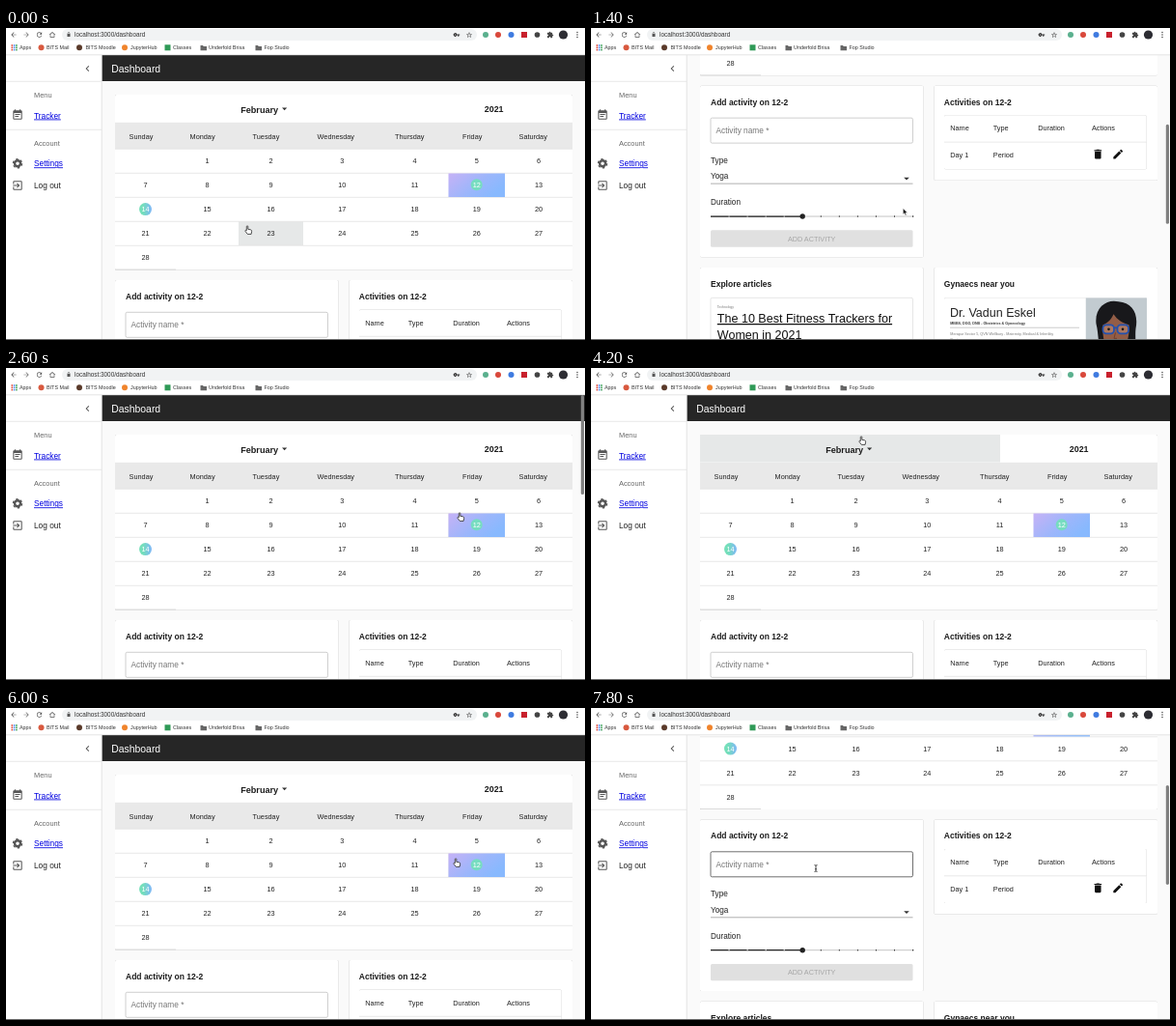
Recreate the animation shown at these times as an HTML page. Size 600x323 px, loop 8 s.

```html
<!DOCTYPE html>
<html lang="en">
<head>
<meta charset="utf-8">
<title>Dashboard</title>
<style>
html, body { margin: 0; width: 100%; height: 100%; overflow: hidden; background: #fff; }
svg { display: block; width: 100vw; height: 100vh; font-family: "Liberation Sans", Arial, sans-serif; }
text { white-space: pre; }
.card { fill: #fff; filter: drop-shadow(0 .5px .7px rgba(0,0,0,.32)); }
.link { text-decoration: underline; }
</style>
</head>
<body>
<svg id="stage" viewBox="0 0 600 323" preserveAspectRatio="none"></svg>
<script>
const LOOP = 8000, STEP = 200, TOP = 28;
const COLS = [113, 176, 241, 308, 388.5, 458.5, 517, 587];
const DAYS = ['Sunday', 'Monday', 'Tuesday', 'Wednesday', 'Thursday', 'Friday', 'Saturday'];
const ROW_Y = 125, ROW_H = 25;

const ICON = {
  back: 'M20 11H7.8l5.6-5.6L12 4l-8 8 8 8 1.4-1.4L7.8 13H20z',
  reload: 'M17.65 6.35A7.96 7.96 0 0012 4a8 8 0 107.73 10h-2.08A6 6 0 1112 6c1.66 0 3.14.69 4.22 1.78L13 11h7V4z',
  home: 'M12 3L2 12h3v8h14v-8h3zM7 18v-7.5l5-4.5 5 4.5V18z',
  lock: 'M18 9h-1V7A5 5 0 007 7v2H6v12h12zM9 9V7a3 3 0 016 0v2z',
  star: 'M12 2l3 7 7.500.6-5.700 4.900 1.800 7.500-6.600-4-6.600 4 1.800-7.500L1.500 9.600 9 9zM12 7l-1.600 4-4.400.4 3.400 2.800-1 4.300 3.600-2.300 3.600 2.300-1-4.300 3.400-2.800-4.400-.4z',
  key: 'M12.6 10a6 6 0 100 4H16v4h4v-4h3v-4zM7 14a2 2 0 110-4 2 2 0 010 4z',
  puzzle: 'M20 11h-1V7a2 2 0 00-2-2h-4V4a2.500 2.500 0 00-5 0v1H4a2 2 0 00-2 2v4h2a2.700 2.700 0 010 5H2v4a2 2 0 002 2h4v-2a2.700 2.700 0 015 0v2h4a2 2 0 002-2v-4h1a2.500 2.500 0 000-5z',
  chevron: 'M15.400 7.400L14 6l-6 6 6 6 1.400-1.400L10.800 12z',
  event: 'M17 10H7v2h10zM19 3h-1V1h-2v2H8V1H6v2H5a2 2 0 00-2 2v14a2 2 0 002 2h14a2 2 0 002-2V5a2 2 0 00-2-2zm0 16H5V8h14zm-5-5H7v2h7z',
  exit: 'M10.100 15.600L11.500 17l5-5-5-5-1.400 1.400L12.700 11H3v2h9.700zM19 3H5a2 2 0 00-2 2v4h2V5h14v14H5v-4H3v4a2 2 0 002 2h14a2 2 0 002-2V5a2 2 0 00-2-2z',
  bin: 'M6 19a2 2 0 002 2h8a2 2 0 002-2V7H6zM19 4h-3.500l-1-1h-5l-1 1H5v2h14z',
  pen: 'M3 17.250V21h3.750L17.800 9.940l-3.750-3.750zM20.700 7.040a1 1 0 000-1.400l-2.340-2.340a1 1 0 00-1.400 0l-1.830 1.830 3.750 3.750z'
};

const rect = (x, y, w, h, fill, more = '') =>
  `<rect x="${x}" y="${y}" width="${w}" height="${h}" fill="${fill}" ${more}/>`;
const dot = (x, y, r, fill) => `<circle cx="${x}" cy="${y}" r="${r}" fill="${fill}"/>`;
const line = (x1, y1, x2, y2, color = '#e0e0e0', w = .7) =>
  `<path d="M${x1} ${y1}L${x2} ${y2}" stroke="${color}" stroke-width="${w}"/>`;
const text = (x, y, size, str, fill = '#222', more = '') =>
  `<text x="${x}" y="${y}" font-size="${size}" fill="${fill}" ${more}>${str}</text>`;
const bold = (x, y, size, str) => text(x, y, size, str, '#1c1c1c', 'font-weight="700"');
const mid = 'text-anchor="middle"';
const icon = (name, x, y, size, fill = '#555') =>
  `<path d="${ICON[name]}" fill="${fill}" fill-rule="evenodd" transform="translate(${x - size / 2} ${y - size / 2}) scale(${size / 24})"/>`;
const card = (x, y, w, h) => `<rect class="card" x="${x}" y="${y}" width="${w}" height="${h}" rx="1.5"/>`;
const frame = (x, y, w, h, color = '#dcdcdc', more = '') =>
  rect(x, y, w, h, 'none', `stroke="${color}" stroke-width=".7" rx="1.5" ${more}`);
const caret = (x, y, w) => `<path d="M${x - w} ${y}h${2 * w}l${-w} ${w}z" fill="#333"/>`;

function browser() {
  let s = rect(0, 0, 600, TOP, '#fff') + rect(58, 1, 430, 12, '#f1f3f4', 'rx="6"');
  s += icon('back', 8, 7, 8) + `<g transform="rotate(180 21 7)">${icon('back', 21, 7, 8, '#777')}</g>`;
  s += icon('reload', 34.5, 7, 8) + icon('home', 48, 7, 8) + icon('lock', 65, 6.700, 6);
  s += text(71, 9.200, 6.4, 'localhost:3000/dashboard', '#333');
  s += icon('key', 467, 7, 7, '#333') + icon('star', 480, 7, 7);
  s += dot(497, 7, 3, '#5bb08e') + dot(510, 7, 3, '#d9483b') + dot(523.5, 7, 3, '#3f7be0');
  s += rect(534, 4, 6, 6, '#c8202c') + dot(550.5, 7, 2.8, '#444') + icon('puzzle', 564, 7, 7.5, '#444');
  s += dot(577.5, 7, 4.600, '#2d2d33');
  for (const y of [4.500, 7, 9.5]) s += dot(592, y, .8, '#555');
  const tints = ['#e34b3d', '#4b8df0', '#43a45b'];
  for (let i = 0; i < 9; i++) s += rect(5.5 + i % 3 * 2.3, 17.2 + (i / 3 | 0) * 2.3, 1.6, 1.6, tints[i % 3]);
  s += dot(36.500, 20.2, 3, '#d8593f') + dot(76, 20.2, 3, '#5a3a2a') + dot(123, 20.2, 3, '#f0842c');
  s += rect(164.5, 17.3, 6, 6, '#2f9a57');
  for (const x of [201.5, 258.5]) s += `<path d="M${x} 18h2.500l.8 1h3.200v4.200h-6.500z" fill="#666"/>`;
  [[14, 'Apps'], [42, 'BITS Mail'], [82.5, 'BITS Moodle'], [129, 'JupyterHub'], [173, 'Classes'],
   [210, 'Underfold Brisa'], [267.5, 'Fop Studio']].forEach(([x, t]) => s += text(x, 22.2, 5.4, t, '#333'));
  return s + line(0, 27.8, 600, 27.8, '#dadada');
}

function sidebar() {
  let s = rect(0, TOP, 99, 295, '#fff') + line(99.2, TOP, 99.2, 323, '#dcdcdc');
  s += icon('chevron', 84.5, 42, 12) + line(0, 55.3, 99, 55.3) + line(0, 105.3, 99, 105.3);
  s += text(29, 72, 7.4, 'Menu', '#666') + text(29, 122, 7.4, 'Account', '#666');
  s += text(29, 93.5, 8.3, 'Tracker', '#0000e0', 'class="link"');
  s += text(29, 143.3, 8.3, 'Settings', '#0000e0', 'class="link"') + text(29, 166, 8.3, 'Log out');
  s += icon('event', 12, 90, 12.5) + icon('exit', 12, 163, 12.5);
  return s + `<g fill="none" stroke="#555"><circle cx="12" cy="140.3" r="3" stroke-width="2.4"/>
    <circle cx="12" cy="140.3" r="4.6" stroke-width="1.3" stroke-dasharray="2.4 2.417"/></g>`;
}

function calendar() {
  let s = card(113, 69, 474, 181.5) + rect(0, 0, 0, 0, '#e6e8e8', 'id="hover"');
  s += bold(243.2, 88, 9.1, 'February') + caret(288.6, 82.6, 2.6) + bold(495.8, 86.7, 8.9, '2021');
  s += rect(113, 97.8, 474, 27.2, '#e9e9e9');
  DAYS.forEach((d, i) => s += text(COLS[i] + 14.6, 114.5, 7.3, d));
  for (let r = 0; r < 5; r++) s += line(113, ROW_Y + r * ROW_H + .3, 587, ROW_Y + r * ROW_H + .3);
  s += line(113, 250, 176, 250, '#ccc');
  s += rect(458.5, 150.5, 58.5, 24.5, 'url(#cell)') + dot(487.7, 162.3, 6, '#76dcc0') + dot(144.5, 187.6, 6.5, 'url(#today)');
  for (let d = 1; d <= 28; d++) {
    const c = d % 7, x = (COLS[c] + COLS[c + 1]) / 2;
    s += text(x, 140.2 + (d / 7 | 0) * ROW_H, 7.3, d, d == 12 || d == 14 ? '#fff' : '#222', mid);
  }
  return s;
}

function activityForm() {
  let s = card(113, 261, 231.5, 177.500) + bold(124, 280.8, 8.5, 'Add activity on 12-2');
  s += frame(124, 294.3, 209.5, 26, '#bbb', 'id="field"') + text(129.5, 310, 8.3, 'Activity name *', '#757575');
  s += text(124, 340.8, 8.2, 'Type') + text(124, 357.5, 8.2, 'Yoga') + line(124, 362.3, 333.5, 362.3, '#8c8c8c');
  s += caret(327, 355.8, 2.8) + text(124, 384.300, 8.2, 'Duration');
  s += line(124, 396.2, 335, 396.2, '#b5b5b5', .8) + line(124, 396.2, 219, 396.2, '#222', 1.2);
  for (let i = 1; i <= 11; i++) s += rect(123.5 + i * 19.05, 395.5, 1, 1.4, i < 5 ? '#ddd' : '#333');
  s += dot(219.2, 396.2, 2.7, '#222');
  return s + rect(124, 410.5, 209.5, 17.3, '#e0e0e0', 'rx="1.5"') + text(228.7, 421.8, 7.25, 'ADD ACTIVITY', '#a6a6a6', mid);
}

function activityList() {
  let s = card(355.5, 261, 231.5, 98) + bold(365.8, 280.8, 8.5, 'Activities on 12-2') + card(366, 291.5, 209.700, 56);
  [[372.3, 'Name'], [416.8, 'Type'], [463.3, 'Duration'], [519, 'Actions']].forEach(([x, t]) => s += text(x, 307.6, 7.3, t));
  s += line(366, 319.3, 575.7, 319.3) + text(372.3, 335.6, 7.3, 'Day 1') + text(416.8, 335.6, 7.3, 'Period');
  return s + icon('bin', 525.3, 331.8, 13, '#111') + icon('pen', 546.2, 331.8, 13, '#111');
}

function articles() {
  const big = (y, t) => text(130.8, y, 12.55, t, '#111', 'class="link"');
  let s = card(113, 449.2, 231.5, 390) + bold(124, 469, 8.5, 'Explore articles');
  s += frame(124, 480.5, 209.5, 74) + frame(124, 555, 209.5, 74);
  s += text(130.8, 491, 3.4, 'Technology', '#777') + big(506.200, 'The 10 Best Fitness Trackers for') + big(522.8, 'Women in 2021');
  s += text(130.8, 536, 8.3, 'Mendovita | 25 Jan', '#777');
  return s + text(130.8, 565.5, 3.4, 'Fitness', '#777') + big(581, '5 common myths related to women');
}

const portrait = `<svg x="512.500" y="480.500" width="63.500" height="70" viewBox="0 0 63.500 70">
  <path fill="#c2cbd0" d="M0 0h64v70H0z"/>
  <path fill="#18181b" d="M11 27C9 9 23 1 34 4c15 1 21 13 18 28-1 8 1 14-2 21l-12 8-20-3c-6-8-4-20-7-31z"/>
  <path fill="#7b4b38" d="M24 48h15l2 22H24z"/>
  <path fill="#2e7a58" d="M6 70c3-9 10-11 18-12 4 6 11 6 16 0 9 1 15 4 18 12z"/>
  <path fill="#935d46" d="M18 28c5-2 9-6 11-11 4 6 9 9 16 11 1 14-4 29-14 29S17 43 18 28z"/>
  <g fill="#ad7860" stroke="#2451ad" stroke-width="1.800"><rect x="18" y="28" width="11.500" height="9" rx="3.500"/>
  <rect x="33" y="28" width="11.500" height="9" rx="3.500"/><path d="M29 31h4"/></g>
  <g fill="#161616"><circle cx="24" cy="32.500" r="1.300"/><circle cx="38.500" cy="32.500" r="1.300"/></g>
  <path fill="none" stroke="#70402f" d="M31 36l-1.500 6h3"/>
  <path fill="#fff" stroke="#c5303a" stroke-width="1.400" d="M24 46q7 2 14 0-2 6-7 6t-7-6z"/></svg>`;

function doctor(dy) {
  const small = (y, t) => text(372.3, y, 3.75, t, '#777');
  return `<g transform="translate(0 ${dy})">` + card(366, 480.5, 209.7, 70)
    + text(372, 500, 12.5, 'Dr. Vadun Eskel', '#222')
    + text(372.3, 508.3, 3.65, 'MBBS, DGO, DNB - Obstetrics &amp; Gynecology', '#333', 'font-weight="700"')
    + line(372, 511.4, 506, 511.4, '#aaa', .6)
    + small(519, 'Merapur Sector 5, QVN Wellbury - Maternity, Medical &amp; Infertility') + small(525, 'Centre')
    + text(467, 544.6, 7.25, 'BOOK ON VELDRO', '#f01818', mid) + portrait + '</g>';
}

function page() {
  return rect(99, TOP, 501, 830, '#fafafa')
    + `<rect class="card" x="99.500" y="${TOP}" width="501" height="27" style="fill:#262626"/>`
    + text(109.3, 45.700, 10.4, 'Dashboard', '#fff')
    + calendar() + activityForm() + activityList() + articles()
    + card(355.5, 449.2, 231.5, 390) + bold(365.8, 469, 8.5, 'Gynaecs near you') + doctor(0) + doctor(70);
}

const cursors = `
  <path id="hand" d="M-.7 .6c0-1.100 1.500-1.100 1.500 0v2.700l2.600.5c.9.2 1.300.8 1.200 1.700L4.100 8.400H.3L-2 5.400c-.5-.8.4-1.500 1.300-.7z"
    fill="#fff" stroke="#222" stroke-width=".8"/>
  <path id="arrow" d="M0 0v6.300l1.500-1.300 1 2.300 1.100-.5-1-2.200h2z" fill="#111" stroke="#fff" stroke-width=".5"/>
  <path id="beam" d="M-1.500-3.500q1.500 0 1.500 1v5q0 1-1.500 1M1.500-3.500q-1.500 0-1.500 1M0 2.500q0 1 1.500 1M-1 .8h2"
    fill="none" stroke="#222" stroke-width=".8"/>`;

const stage = document.getElementById('stage');
stage.innerHTML = `<defs>
  <clipPath id="view"><path d="M99 ${TOP}h501v295H99z"/></clipPath>
  <linearGradient id="cell" y2=".5"><stop stop-color="#c6b2f6"/><stop offset=".6" stop-color="#9cb6fb"/><stop offset="1" stop-color="#88b9fe"/></linearGradient>
  <linearGradient id="today"><stop offset=".3" stop-color="#74dfba"/><stop offset="1" stop-color="#7fb6f8"/></linearGradient>
  </defs>${rect(0, 0, 600, 323, '#fff')}
  <g clip-path="url(#view)"><g id="page">${page()}</g></g>
  ${sidebar()}${browser()}
  ${rect(595.8, TOP, 3.2, 103, '#808080', 'id="thumb" rx="1.6"')}
  ${rect(0, 322, 600, 1, '#6a6a6a')}
  <g id="cursor">${cursors}</g>`;
const $ = id => document.getElementById(id);

// keys: [time, value, ...]
const SCROLL = [[0, 0], [200, 25], [400, 150], [600, 261], [1200, 261], [1800, 81.5], [2400, 2], [2600, 0],
  [6200, 0], [6400, 15], [7000, 109], [7400, 145.5], [LOOP, 145.5]];
const POINTER = [[0, 250, 205], [1200, 250, 205], [1800, 470, 150], [2600, 470, 150], [3800, 280, 71], [4400, 280, 71],
  [5000, 500, 84], [5800, 466, 156], [6200, 466, 156], [6800, 253, 174], [7200, 253, 174], [7800, 233, 166], [LOOP, 233, 166]];

function sample(keys, t) {
  const i = keys.findIndex(k => k[0] > t), a = keys[i - 1], b = keys[i];
  const p = (t - a[0]) / (b[0] - a[0]);
  return a.slice(1).map((v, n) => v + (b[n + 1] - v) * p);
}

// The calendar cell under the pointer, as [x, y, w, h].
function cellAt(x, y) {
  if (x < 113 || x > 587) return null;
  if (y > 69 && y < 97.8) return x < 424 ? [113, 69, 311, 28.6] : [424, 69, 163, 28.6];
  const col = COLS.findIndex(c => c > x) - 1, row = Math.floor((y - ROW_Y) / ROW_H), day = row * 7 + col;
  if (row < 0 || day < 1 || day > 28) return null;
  return [COLS[col], ROW_Y + row * ROW_H + .5, COLS[col + 1] - COLS[col], ROW_H - .5];
}

function draw(ms) {
  const t = Math.floor(ms % LOOP / STEP) * STEP;
  const [scroll] = sample(SCROLL, t), [x, y] = sample(POINTER, t), py = y + scroll;
  const cell = y > TOP ? cellAt(x, py) : null;
  const inField = x > 124 && x < 333.5 && py > 294 && py < 320.5;
  const kind = t < 1300 || cell ? 'hand' : inField ? 'beam' : 'arrow';

  $('page').setAttribute('transform', `translate(0 ${-scroll})`);
  ['x', 'y', 'width', 'height'].forEach((a, i) => $('hover').setAttribute(a, cell ? cell[i] : 0));
  $('field').setAttribute('stroke', inField ? '#333' : '#bbb');
  $('thumb').setAttribute('y', TOP + scroll * .357);
  $('thumb').setAttribute('opacity', t >= 200 && t < 3200 || t >= 6400 ? 1 : 0);
  $('cursor').setAttribute('transform', `translate(${x} ${y})`);
  for (const id of ['hand', 'arrow', 'beam']) $(id).setAttribute('display', id == kind ? 'inline' : 'none');
}

const start = performance.now();
function tick() {
  draw(performance.now() - start);
  requestAnimationFrame(tick);
}
tick();
</script>
</body>
</html>
```
